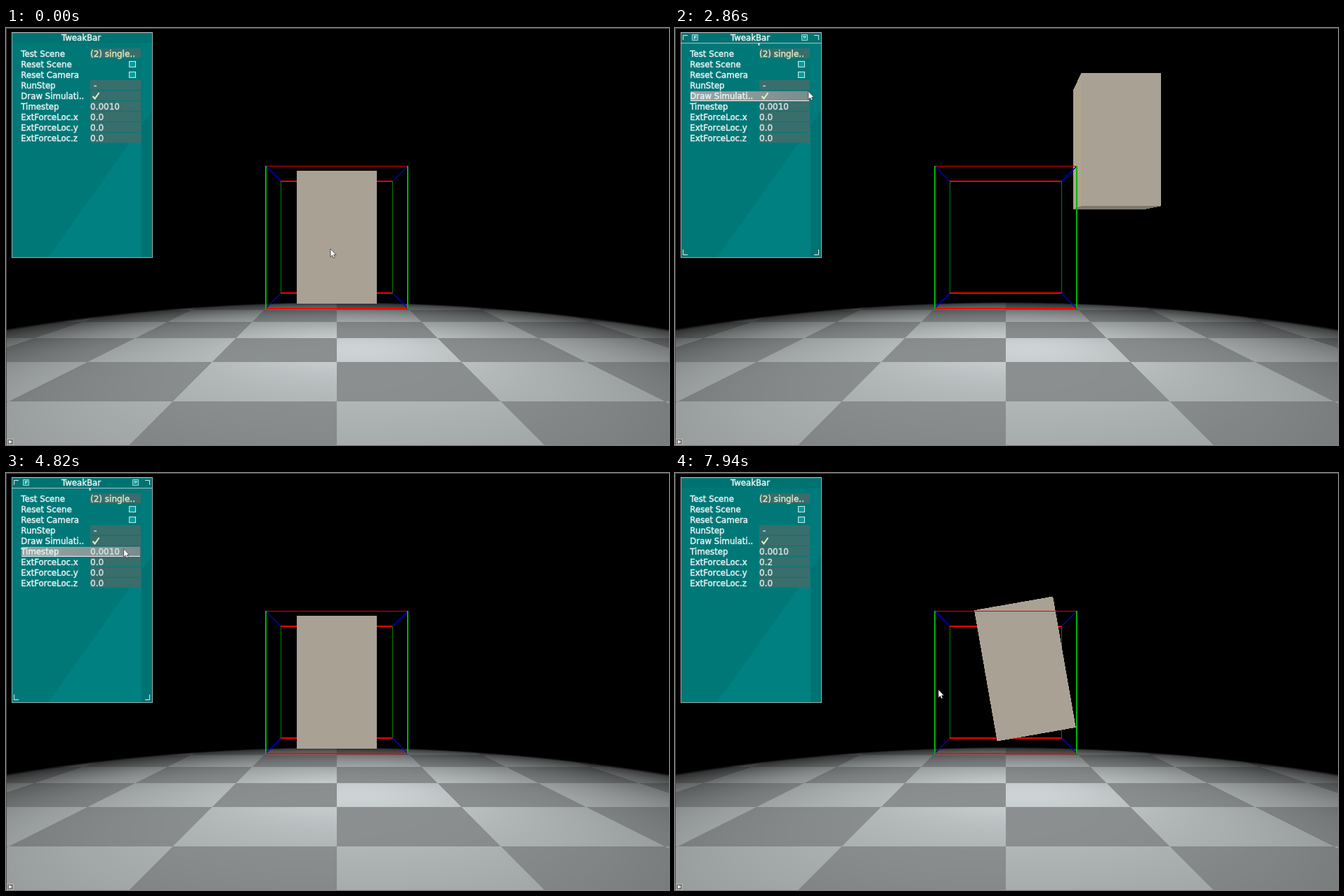
An HTML page with a canvas that plays this animation: 944 by 593 pixels, repeating every 8000 ms.

```html
<!DOCTYPE html>
<html lang="en">
<head>
<meta charset="utf-8">
<title>Rigid box demo</title>
<style>
html, body { margin: 0; width: 100%; height: 100%; overflow: hidden; background: #000; }
canvas, svg { position: absolute; left: 0; top: 0; width: 944px; height: 593px; }
.label, .value { font: 11.75px "DejaVu Sans", sans-serif; stroke-width: .45px; }
.label { fill: #e8f2f2; stroke: #e8f2f2; }
.value { font-size: 12px; fill: #d2e4e2; stroke: #d2e4e2; }
.pick { fill: #dce8c0; stroke: #dce8c0; }
.crisp { shape-rendering: crispEdges; }
</style>
</head>
<body>
<canvas id="floor" width="944" height="593"></canvas>
<svg id="stage" width="944" height="593" viewBox="0 0 944 593">
  <defs>
    <linearGradient id="glow"><stop offset="0" stop-color="#9aa5a5"/><stop offset="1" stop-color="#7a8c8c"/></linearGradient>
  </defs>
  <path d="M.5 593V.5H944" fill="none" stroke="#4a4a4a"/>
  <g id="corner">
    <rect x="1.5" y="584.5" width="9" height="8" fill="#777" stroke="#bbb"/>
    <path d="M4 586l5 2.5-5 2.5z" fill="#eee"/>
  </g>
  <g class="crisp">
    <g id="wireBack"></g>
    <g id="box"></g>
    <g id="wireFront"></g>
  </g>
  <g id="panel">
    <rect x="8" y="6" width="200" height="320" fill="#007878"/>
    <path d="M60 326L194 138V326z" fill="#008080"/>
    <rect x="193" y="21" width="15" height="305" fill="#007272"/>
    <path d="M193 138L208 118V21H193z" fill="#007a7a"/>
    <rect x="8" y="6" width="200" height="15" fill="#007272"/>
    <rect x="8" y="6" width="200" height="320" fill="none" stroke="#9aabab" class="crisp"/>
    <path d="M8 6.5H208" stroke="#c4cccc"/>
    <text class="label" x="107" y="17.5" text-anchor="middle">TweakBar</text>
    <g id="hover" fill="none" stroke="#dfeaea">
      <path d="M8 21.5H208" stroke="#a8c4c4"/>
      <path d="M119.5 21V25" stroke-width="2"/>
      <path d="M11.5 17V10.5H18M204.5 17V10.5H198M11.5 315V322.5H18M204.5 315V322.5H198"/>
      <path d="M24.5 9.5h8v8h-8zM180.5 9.5h8v8h-8z" fill="#009a9a" stroke="#a0dcdc"/>
      <path d="M27.5 16v-4.500h3.500M27.5 13.5h3M182.5 12l2 2.500 2-2.500z"/>
    </g>
    <g id="cells"></g>
    <g id="bar">
      <rect x="22" width="169" height="14" fill="url(#glow)"/>
      <rect x="22" y="13" width="169" height="1" fill="#eef4f4"/>
    </g>
    <g id="rows"></g>
    <g id="spin">
      <path d="M161 121h10v11h-10zM172 121h9v11h-9z" fill="#279c9c"/>
      <rect x="182" y="121" width="9" height="11" fill="#4c5c5c"/>
      <path d="M164 126.5h4M173.5 126.5h6M176.5 123.5v6" stroke="#fff"/>
      <circle cx="186.5" cy="126.5" r="1.7" fill="#e0e8e8"/>
    </g>
    <path d="M123.5 97l3 3.500 6-8.500" fill="none" stroke="#dff3c4" stroke-width="2"/>
  </g>
  <g id="zoom">
    <rect x="175" y="84" width="30" height="29" rx="4" fill="#b01e22"/>
    <circle cx="188.5" cy="97" r="6.5" fill="none" stroke="#f0dede" stroke-width="1.5"/>
    <path d="M193 102l5 5" stroke="#f0dede" stroke-width="2"/>
  </g>
  <path id="cursor" d="M0 0V11.500L2.600 9.200 4.300 13 6.300 12.200 4.700 8.500H8z" fill="#fff" stroke="#222" stroke-width=".7"/>
</svg>
<script>
const LOOP = 8000, CX = 470.8, CY = 297.5;
const $ = id => document.getElementById(id);

function add(parent, tag, attrs, text) {
  const el = document.createElementNS("http://www.w3.org/2000/svg", tag);
  for (const k in attrs) el.setAttribute(k, attrs[k]);
  if (text) el.textContent = text;
  return parent.appendChild(el);
}

// Checkered ground under a round pool of light with a visible rim
function paintFloor() {
  const ctx = $("floor").getContext("2d");
  const top = 384, w = 944, h = 593 - top, radius = 3.97;
  const img = ctx.createImageData(w, h);
  for (let y = 0, i = 0; y < h; y++) {
    const dy = y + top + .5 - CY, z = 743 / dy;
    for (let x = 0; x < w; x++, i += 4) {
      const u = (x + .5 - CX) / dy;
      const r = Math.hypot(u, z - 4.08) / radius;
      const light = (Math.floor(u) + Math.floor(z - 3.176)) & 1;
      const rim = Math.min(1, Math.max(0, (1 - r) * 25));
      const fall = rim * (1 - .74 * r ** 3);
      const shine = Math.exp(-((u - .2) ** 2 + (z - 4.7) ** 2) / 1.2);
      const v = fall * (light ? 174 + 32 * shine : 139);
      img.data[i] = v;
      img.data[i + 1] = v * 1.03;
      img.data[i + 2] = v * 1.035;
      img.data[i + 3] = 255;
    }
  }
  ctx.putImageData(img, 0, top);
}

// Wire cube, split where the solid box cuts through its depth
function buildWire() {
  const line = (g, x1, y1, x2, y2, stroke, width) =>
    add(g, "line", { x1, y1, x2, y2, stroke, "stroke-width": width });
  const back = $("wireBack"), front = $("wireFront");
  for (const sx of [-1, 1]) for (const sy of [-1, 1]) {
    const spoke = (g, a, b) =>
      line(g, CX + sx * a, CY + sy * a, CX + sx * b, CY + sy * b, "#0000c4", 1.7);
    spoke(back, 79.7, 94);
    spoke(front, 94, 101);
  }
  for (const y of [218, 377]) line(back, 391, y, 550, y, "#f80000", 2);
  for (const x of [391.5, 550.5]) line(back, x, 218, x, 377, "#008000", 1);
  line(front, 370, 196.5, 572, 196.5, "#e00000", 1);
  line(front, 370, 399, 572, 399, "#f00000", 2);
  for (const x of [370, 572]) line(front, x, 196, x, 399, "#00b40a", 2);
}

const LABELS = ["Test Scene", "Reset Scene", "Reset Camera", "RunStep", "Draw Simulati..",
  "Timestep", "ExtForceLoc.x", "ExtForceLoc.y", "ExtForceLoc.z"];
const VALUES = ["(2) single..", null, null, "-", "", "0.0010", "0.0", "0.0", "0.0"];
const buttons = {};
let forceText;

function buildRows() {
  LABELS.forEach((label, i) => {
    const cy = 36 + 15 * i, value = VALUES[i];
    add($("rows"), "text", { class: "label", x: 21.3, y: cy + 4.5 }, label);
    if (value === null) {
      buttons[i] = add($("rows"), "rect", { x: 175.5, y: cy - 3.5, width: 9, height: 8, stroke: "#d4ecec" });
      return;
    }
    add($("cells"), "rect", { x: 120, y: cy - 7, width: 72, height: 14, fill: "#386e6c" });
    const text = add($("rows"), "text",
      { class: i ? "value" : "value pick", x: i === 3 ? 125 : 120, y: cy + 4.5 }, value);
    if (i === 6) forceText = text;
  });
}

const faces = ["#b4ad9f", "#9c9588", "#7d776d", "#aea58f"].map(fill => add($("box"), "polygon", { fill }));
const face = add($("box"), "polygon", { fill: "#a8a194" });

function drawBox(x, y, angle) {
  const c = Math.cos(angle), s = Math.sin(angle);
  const near = [[-1, -1], [1, -1], [1, 1], [-1, 1]].map(([a, b]) => {
    const px = a * 56.9, py = b * 94.6;
    return [x + px * c - py * s, y + px * s + py * c];
  });
  const far = near.map(([px, py]) => [CX + (px - CX) * .893, CY + (py - CY) * .893]);
  faces.forEach((el, i) => {
    const j = (i + 1) % 4, [p, q, r] = [near[i], near[j], far[j]];
    const turn = (q[0] - p[0]) * (r[1] - q[1]) - (q[1] - p[1]) * (r[0] - q[0]);
    el.setAttribute("points", turn < 0 ? [p, q, r, far[i]].join(" ") : "");
  });
  face.setAttribute("points", near.join(" "));
}

// Screen refresh moments: first, last, count
const RUNS = [[400, 1340, 8], [1460, 2260, 7], [2410, 3400, 8], [3520, 4160, 6],
  [4410, 4940, 5], [5220, 6020, 7], [6170, 7940, 14]];
const TICKS = [0];
for (const [a, b, n] of RUNS)
  for (let i = 0; i < n; i++) TICKS.push(Math.round(a + (b - a) * i / (n - 1)));

// Tables of [time, x, y, ...]
const POINTER = [[0, 462, 314], [500, 462, 314], [1200, 510, 238], [1500, 510, 238],
  [2260, 316, 200], [2410, 302, 190], [3000, 146, 51], [4160, 146, 51], [4530, 150, 76],
  [4940, 176, 123], [5620, 176, 123], [6020, 234, 147], [6170, 406, 250], [6560, 470, 310],
  [7150, 470, 310], [7400, 375, 308]];
const BOX = [[0, 471, 297.5, 0], [640, 471, 297.5, 0], [1340, 525.3, 252.7, 0],
  [2260, 597, 191.5, 0], [3400, 672.8, 126.3, 0], [4159, 721, 89, 0], [4160, 471, 297.5, 0],
  [7178, 471, 297.5, 0], [7940, 498.4, 278.5, -.1735]];

function sample(keys, t) {
  const i = keys.findIndex(k => k[0] > t);
  if (i < 0) return keys[keys.length - 1].slice(1);
  const a = keys[i - 1], b = keys[i], p = (t - a[0]) / (b[0] - a[0]);
  return a.slice(1).map((v, n) => v + (b[n + 1] - v) * p);
}

const show = (id, on) => $(id).setAttribute("visibility", on ? "visible" : "hidden");

function draw(time) {
  const t = TICKS.filter(k => k <= time + .5).pop();
  const [x, y] = sample(POINTER, t);
  drawBox(...sample(BOX, t));
  $("cursor").setAttribute("transform", `translate(${x} ${y})`);

  const hover = t > 2700 && t < 6150;
  let row = -1;
  if (hover) row = t > 4900 ? 6 : x < 192 ? Math.floor((y - 29) / 15) : -1;
  if (row > 8) row = -1;
  show("hover", hover);
  show("bar", row >= 0);
  show("spin", row === 6);
  show("zoom", t >= 5350 && t < 6300);
  $("bar").setAttribute("transform", `translate(0 ${30 + 15 * row})`);
  for (const i in buttons) buttons[i].setAttribute("fill", +i === row ? "#5c6868" : "#009c9c");
  forceText.textContent = t < 5220 ? "0.0" : t < 5350 ? "0.1" : "0.2";
}

paintFloor();
buildWire();
buildRows();
const start = performance.now();
function loop() {
  draw((performance.now() - start) % LOOP);
  requestAnimationFrame(loop);
}
loop();
</script>
</body>
</html>
```
